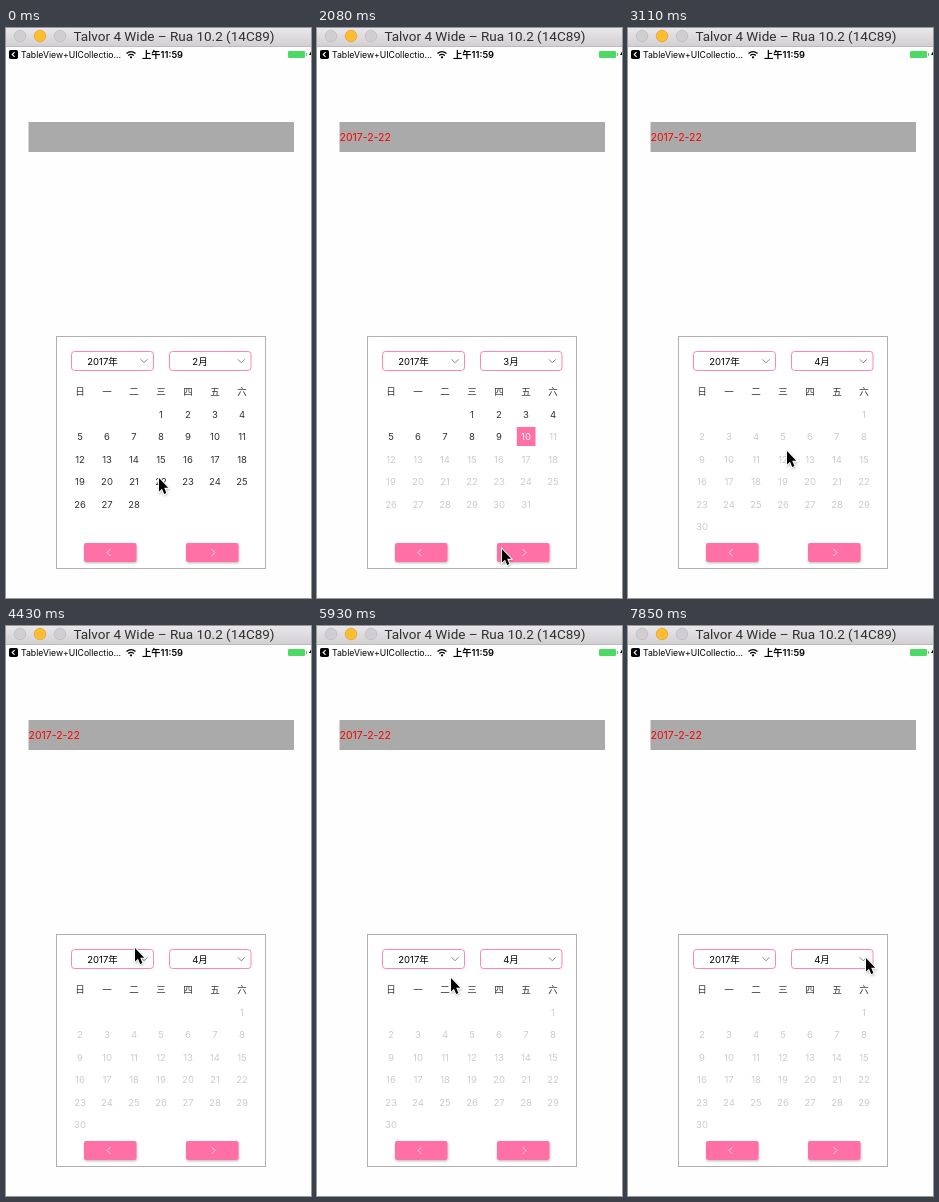
These frames come from a looping animation (305 by 570 pixels, 7990 ms). An HTML page:

```html
<!DOCTYPE html>
<html lang="zh">
<head>
<meta charset="utf-8">
<title>Calendar picker</title>
<style>
  html, body { margin: 0; width: 100%; height: 100%; overflow: hidden; background: #fefefe; }
  svg { display: block; font: 9.5px Inter, "Noto Sans CJK SC", "Noto Sans CJK", sans-serif; }
  .mid { text-anchor: middle; }
  .line { fill: none; stroke: #777; stroke-width: .9; }
  .box { fill: #fff; stroke: #ff70a6; stroke-width: .85; }
  .title { font: 13.5px Roboto, sans-serif; fill: #303030; }
</style>
</head>
<body>
<svg width="305" height="570" viewBox="0 0 305 570">
  <defs>
    <linearGradient id="bar" x2="0" y2="1">
      <stop stop-color="#e9e7e9"/><stop offset="1" stop-color="#d2d0d2"/>
    </linearGradient>
    <filter id="shadow" x="-20%" y="-30%" width="140%" height="180%">
      <feDropShadow dx=".5" dy="1.2" stdDeviation=".9" flood-color="#555" flood-opacity=".4"/>
    </filter>
    <clipPath id="listClip"><rect id="listArea" x="65" y="343" width="83" height="0"/></clipPath>
  </defs>

  <!-- window title and status bar -->
  <rect width="305" height="18" fill="url(#bar)"/>
  <path d="M0 18.5H305" stroke="#bbb"/>
  <g stroke-width=".7">
    <circle cx="14" cy="8" r="5.8" fill="#d0ced0" stroke="#bcbabc"/>
    <circle cx="34" cy="8" r="5.8" fill="#fdbd2f" stroke="#dea02c"/>
    <circle cx="54" cy="8" r="5.8" fill="#d0ced0" stroke="#bcbabc"/>
  </g>
  <text class="title mid" x="168" y="13">Talvor 4 Wide – Rua 10.2 (14C89)</text>
  <rect x="3" y="22" width="9" height="9" rx="1.8"/>
  <path d="M8.6 24.2L6.2 26.5L8.6 28.8" fill="none" stroke="#fff" stroke-width="1.1"/>
  <text x="15" y="30" font-size="8.7">TableView+UICollectio...</text>
  <g fill="none" stroke="#000" stroke-width="1.3">
    <path d="M120.5 25.5Q125 21.7 129.5 25.5M122.2 27.5Q125 25.2 127.8 27.5"/>
    <circle cx="125" cy="29.3" r=".5"/>
  </g>
  <text x="136" y="30" font-size="9.3" font-weight="600">上午11:59</text>
  <rect x="282" y="23" width="17" height="7" rx="1.2" fill="#4cd964"/>
  <path d="M300.5 25V28" stroke="#4cd964"/>
  <path d="M305 23.5L303 27H305Z"/>

  <!-- result field and calendar frame -->
  <rect x="22.5" y="94" width="265.5" height="30" fill="#aaa"/>
  <text id="result" x="22.5" y="113" font-size="10.5" fill="#f00">2017-2-22</text>
  <rect x="50.5" y="308.5" width="209" height="232" fill="#fff" stroke="#b0b0b0"/>
  <rect class="box" x="65.5" y="323.5" width="82" height="19" rx="3"/>
  <rect class="box" x="163.5" y="323.5" width="81.5" height="19" rx="3"/>
  <text class="mid" x="96.5" y="337">2017年</text>
  <text class="mid" x="194" y="337" id="month"></text>
  <path class="line" id="yearArrow"/>
  <path class="line" d="M231.8 331.3L235.3 334.8L238.8 331.3"/>
  <g class="mid" id="week"></g>
  <g class="mid" id="days"></g>
  <g id="list" clip-path="url(#listClip)">
    <rect class="box" id="listBox" x="65.5" y="343.5" width="82" rx="3"/>
    <rect id="flash" x="66" y="344" width="81" height="21" fill="#d9d9d9"/>
    <g class="mid" id="years"></g>
  </g>
  <g fill="#ff70a6" filter="url(#shadow)">
    <rect x="78" y="515" width="52.5" height="19" rx="2"/>
    <rect id="next" x="180" y="515" width="52.5" height="19" rx="2"/>
  </g>
  <path d="M104.5 521L101 524.5L104.5 528M205.5 521L209 524.5L205.5 528" fill="none" stroke="#ffe6f0" stroke-width=".9"/>
  <g id="cursor" filter="url(#shadow)">
    <path d="M1 1V14.4L4 11.7L6.2 16.9L8.4 15.9L6.2 10.8H10.2Z" stroke="#fff" stroke-width="1.8" paint-order="stroke"/>
  </g>
</svg>

<script>
const LOOP = 7990, TICK = 148, PINK = '#ff70a6';
const $ = id => document.getElementById(id);
const show = (id, on) => $(id).style.display = on ? '' : 'none';
const clamp = v => Math.min(1, Math.max(0, v));
const easeOut = p => 1 - (1 - p) ** 2;
const label = (x, y, text, fill = '#000') => `<text x="${x}" y="${y}" fill="${fill}">${text}</text>`;
const colX = i => 74 + 27 * i;

// Pointer moves: first tick, last tick, destination
const moves = [
  [2, 5, 186, 529],   // next button
  [13, 14, 184, 520],
  [17, 21, 158, 422], // over the days
  [21, 23, 151, 410],
  [25, 27, 85, 526],  // previous button
  [27, 31, 131, 307],
  [31, 33, 134, 332], // year box
  [35, 37, 133, 351], // first year
  [41, 43, 113, 345],
  [43, 46, 182, 335], // month box
  [48, 53, 237, 331]
];

function pointerAt(tick) {
  let x = 152, y = 449;
  for (const [from, to, endX, endY] of moves) {
    const p = easeOut(clamp((tick - from) / (to - from)));
    x += (endX - x) * p;
    y += (endY - y) * p;
  }
  return `translate(${Math.round(x)} ${Math.round(y)})`;
}

function monthDays(month, picked) {
  const first = new Date(2017, month - 1, 1).getDay();
  const count = new Date(2017, month, 0).getDate();
  let out = '';
  for (let day = 1; day <= count; day++) {
    const cell = first + day - 1;
    const x = colX(cell % 7), y = 386 + 22.5 * Math.floor(cell / 7);
    const marked = day === picked;
    const future = month > 3 || month === 3 && day > 10;
    if (marked) out += `<rect x="${x - 9.2}" y="${y - 9.5}" width="18.7" height="19" fill="${PINK}"/>`;
    out += label(x, y + 3.5, day, marked ? '#fff' : future ? '#ccc' : '#333');
  }
  return out;
}

$('week').innerHTML = [...'日一二三四五六'].map((d, i) => label(colX(i), 366.5, d, '#333')).join('');
$('years').innerHTML = Array.from({ length: 8 }, (_, i) => label(106.5, 357.5 + 21.75 * i, 2017 - i)).join('');

function render(tick) {
  const month = tick < 9 ? 2 : tick < 16 ? 3 : 4;
  const picked = month === 3 ? 10 : month === 2 && tick >= 1 ? 22 : 0;
  $('month').textContent = month + '月';
  $('days').innerHTML = monthDays(month, picked);
  show('result', tick >= 1);

  // The year list unfolds and folds over two ticks
  const height = 165 * clamp(Math.min(tick - 33, 40 - tick) / 2);
  show('list', height > 0);
  show('flash', tick === 38);
  $('listArea').setAttribute('height', height);
  $('listBox').setAttribute('height', Math.max(0, height - 1));
  const tip = height ? -1.75 : 1.75;
  $('yearArrow').setAttribute('d', `M134.5 ${333 - tip}L138 ${333 + tip}L141.5 ${333 - tip}`);

  $('next').setAttribute('fill', tick === 8 || tick === 15 ? '#e0628f' : PINK);
  $('cursor').setAttribute('transform', pointerAt(tick));
}

let last = -1;
function frame(now) {
  // A small lead keeps each tick from landing late
  const tick = Math.floor((now % LOOP + 12) / TICK);
  if (tick !== last) render(last = tick);
  requestAnimationFrame(frame);
}
frame(0);
</script>
</body>
</html>
```
